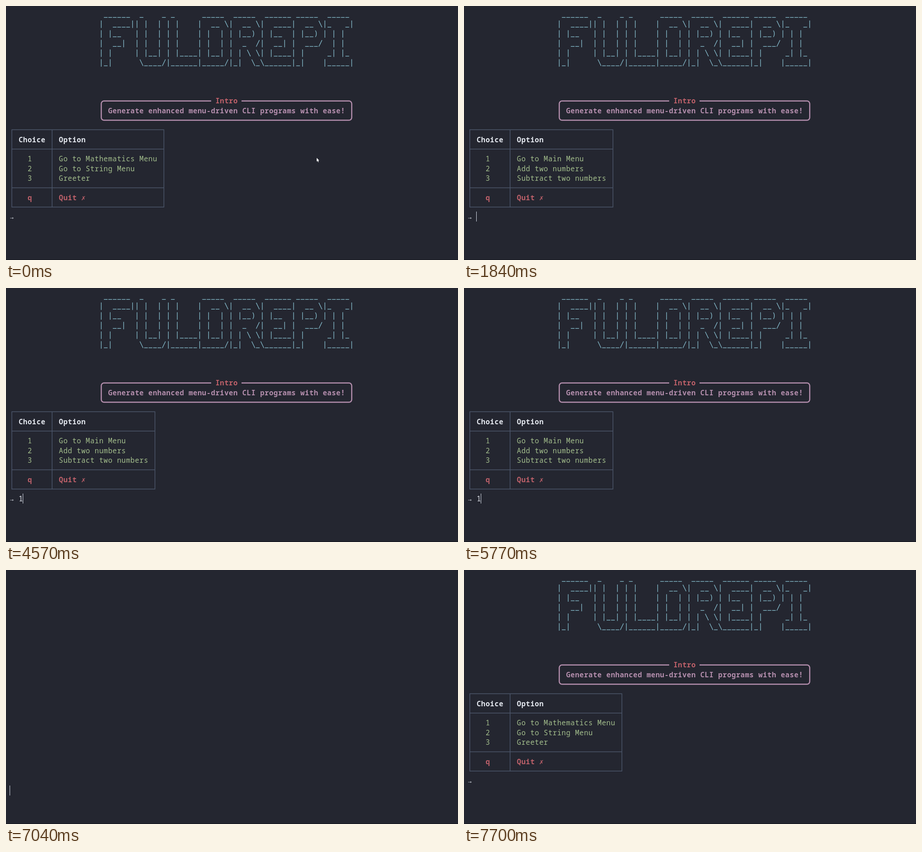
These frames come from a looping animation (998x561 px, 8000 ms). An HTML page with a canvas:

```html
<!DOCTYPE html>
<html lang="en">
<head>
<meta charset="utf-8">
<title>Terminal menu</title>
<style>
  html, body { margin: 0; width: 100%; height: 100%; overflow: hidden; background: #242630; }
  canvas { display: block; }
</style>
</head>
<body>
<canvas width="998" height="561"></canvas>
<script>
const ctx = document.querySelector('canvas').getContext('2d');
const LOOP = 8000;
const CELL_W = 9.875, CELL_H = 21.35;
const BG = '#242630', CYAN = '#88c0d0', RED = '#bf616a', GREEN = '#a3be8c',
      PURPLE = '#b48ead', GREY = '#4c566a', WHITE = '#e5e9f0';

const BANNER = String.raw`
 ______  _    _ _      _____  _____  ______ _____  _____ 
|  ____|| |  | | |    |  __ \|  __ \|  ____|  __ \|_   _|
| |__   | |  | | |    | |  | | |__) | |__  | |__) | | |  
|  __|  | |  | | |    | |  | |  _  /|  __| |  ___/  | |  
| |     | |__| | |____| |__| | | \ \| |____| |     _| |_ 
|_|      \____/|______|_____/|_|  \_\______|_|    |_____|`.split('\n').slice(1);

const MAIN = { right: 34, options: ['Go to Mathematics Menu', 'Go to String Menu', 'Greeter'] };
const MATHS = { right: 32, options: ['Go to Main Menu', 'Add two numbers', 'Subtract two numbers'] };

// Centre of a terminal cell
const cellX = col => 7.9 + CELL_W * (col + 0.5);
const cellY = row => 17.1 + CELL_H * row;

function write(text, col, row, color, weight = 500) {
  ctx.font = `${weight} 15.5px "Noto Sans Mono", "DejaVu Sans Mono", monospace`;
  ctx.textAlign = 'center';
  ctx.fillStyle = color;
  const baseline = Math.round(cellY(row) + 6);
  [...text].forEach((ch, i) => ctx.fillText(ch, cellX(col + i), baseline));
}

function line(x1, y1, x2, y2) {
  ctx.beginPath();
  ctx.moveTo(x1, y1);
  ctx.lineTo(x2, y2);
  ctx.stroke();
}

function drawBanner() {
  const strokes = {
    '|': [0, -6.4, 0, 10.1],
    '_': [-4.1, 8.2, 4.1, 8.2],
    '/': [3.5, -5.8, -3.5, 8.6],
    '\\': [-3.5, -5.8, 3.5, 8.6]
  };
  ctx.strokeStyle = CYAN;
  ctx.lineWidth = 1.3;
  BANNER.forEach((text, row) => [...text].forEach((ch, i) => {
    const x = cellX(20 + i), y = cellY(row), s = strokes[ch];
    if (s) line(x + s[0], y + s[1], x + s[2], y + s[3]);
    else write(ch, 20 + i, row, CYAN);
  }));
}

function drawIntro() {
  const x = cellX(20), y = 209.8;
  ctx.strokeStyle = PURPLE;
  ctx.lineWidth = 2.5;
  ctx.beginPath();
  ctx.roundRect(x, y, cellX(76) - x, CELL_H * 2 - 0.2, 6);
  ctx.stroke();
  ctx.fillStyle = BG;
  ctx.fillRect(453, y - 4, 67, 8);
  write('Intro', 46, 9, RED, 700);
  write('Generate enhanced menu-driven CLI programs with ease!', 22, 10, PURPLE, 700);
}

function drawTable({ right, options }) {
  const x1 = cellX(0), x2 = cellX(right), top = cellY(12), bottom = cellY(20);
  ctx.strokeStyle = GREY;
  ctx.lineWidth = 1.5;
  ctx.strokeRect(x1, top, x2 - x1, bottom - top);
  line(cellX(9), top, cellX(9), bottom);
  for (const row of [14, 18]) line(x1, cellY(row), x2, cellY(row));
  write('Choice', 2, 13, WHITE, 700);
  write('Option', 11, 13, WHITE, 700);
  options.forEach((text, i) => {
    write(String(i + 1), 4, 15 + i, GREEN);
    write(text, 11, 15 + i, GREEN);
  });
  write('q', 4, 19, RED, 700);
  write('Quit', 11, 19, RED, 700);
  write('✗', 16, 19, RED);
}

function drawCaret(col, row) {
  ctx.fillStyle = '#d8dee9';
  ctx.fillRect(Math.floor(8 + CELL_W * col), Math.round(cellY(row) - 11), 1, 22);
}

function drawPointer(t) {
  const step = t < 500 ? 0 : Math.min(4, Math.floor((t - 500) / 90) + 1);
  const k = Math.sin(step / 4 * Math.PI / 2);
  const x = 686 - 46 * k, y = 335.5 + 54.5 * k;
  ctx.fillStyle = '#fff';
  ctx.beginPath();
  [[0, 0], [0, 8], [1.9, 6.4], [3.2, 9.4], [4.4, 8.9], [3.2, 6], [5.6, 5.8]]
    .forEach(([dx, dy]) => ctx.lineTo(x + dx, y + dy));
  ctx.fill();
}

// Each toggle flips the caret; it starts hidden
const TOGGLES = [680, 2440, 2970, 3570, 4100, 5170, 5770, 6300, 6840, 7700];

function draw(t) {
  ctx.fillStyle = BG;
  ctx.fillRect(0, 0, 998, 561);
  ctx.fillStyle = '#14161c';
  ctx.fillRect(0, 560, 998, 1);

  if (t >= 7040 && t < 7100) return drawCaret(0, 22);

  const typed = (t >= 1240 && t < 1840) || (t >= 4570 && t < 7040);
  drawBanner();
  drawIntro();
  drawTable(t >= 1840 && t < 7040 ? MATHS : MAIN);
  write('→', 0, 21, WHITE);
  if (typed) write('1', 2, 21, WHITE);
  if (TOGGLES.filter(time => time <= t).length % 2) drawCaret(typed ? 3 : 2, 21);
  if (t < 1240) drawPointer(t);
}

const start = performance.now();
function tick() {
  draw((performance.now() - start) % LOOP);
  requestAnimationFrame(tick);
}
tick();
</script>
</body>
</html>
```
